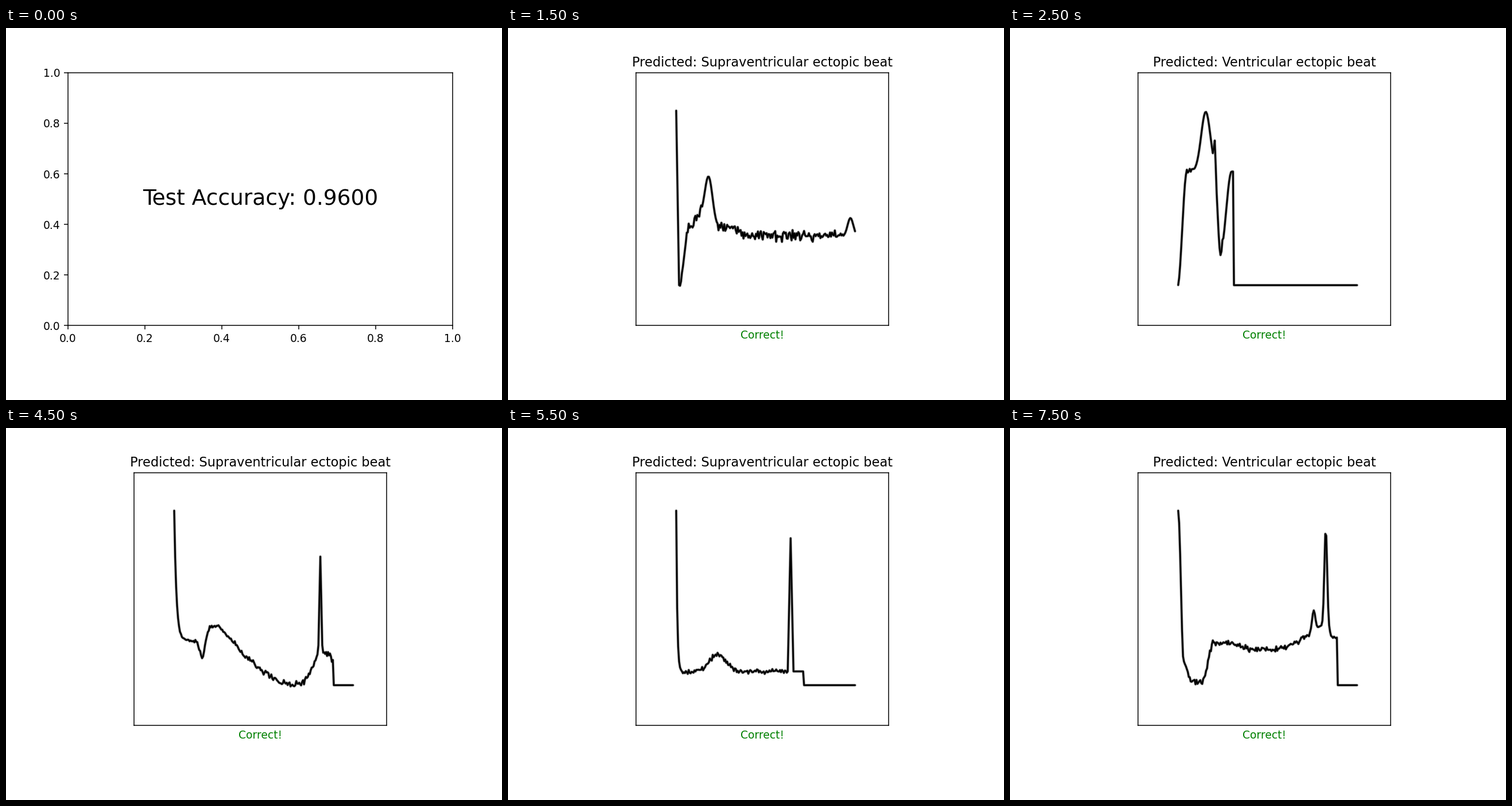
Recreate the animation shown at these times as a matplotlib script. Size 864x648 px, loop 8000 ms.

```python
import numpy as np
import matplotlib.pyplot as plt
from matplotlib.animation import FuncAnimation

W, H, DPI = 864, 648, 135
FLAT = 448                            # y of the zero padding
X = np.linspace(293, 604.5, 187)      # sample positions in stage pixels
STROKES = [(4.9, 0.22), (3.8, 0.5), (2.5, 1.0)]  # soft edge: width in px, alpha

rng = np.random.default_rng(7)


# All heights are in pixels; positive heights point up the stage.
def part(x0, x1):
    return np.clip((X - x0) / (x1 - x0), 0, 1)


def ramp(x0, x1):
    t = part(x0, x1)
    return t * t * (3 - 2 * t)


def bump(centre, height, width):
    return -height * np.exp(-((X - centre) / width) ** 2 / 2)


def spike(centre, height, half):
    centre = X[np.argmin(abs(X - centre))]
    return -height * np.clip(1 - abs(X - centre) / half, 0, 1)


def decay(height, span):
    return -height * np.exp(-(X - X[0]) / span)


def jitter(x0, x1, amp):
    noise = np.clip(rng.normal(0, amp, X.size), -2.2 * amp, 2.2 * amp)
    return np.where((X > x0) & (X < x1), noise, 0)


def pad(y, x0):
    return np.where(X > x0, FLAT, y)


def late_peak():
    y = 390 + decay(200, 3) + bump(350, 55, 14) + spike(529, 246, 4)
    return pad(y + jitter(300, 522, 2.5), 558)


def noisy_rest():
    y = 348 + 15 * ramp(380, 425)
    y += 100 * (1 - ramp(298, 315)) - 304 * (1 - part(293, 298))
    y += bump(333, 18, 9) + bump(349.5, 86, 6.8) + bump(596.5, 32, 5)
    return y + jitter(299, 338, 4) + jitter(364, 586, 5)


def tall_hump():
    y = 450 - 200 * ramp(292, 308) + bump(341, 104, 8) + spike(357, 40, 3)
    y += 147 * ramp(356, 367) * (1 - ramp(366, 386)) + spike(370.5, 12, 2)
    return pad(y + jitter(305, 320, 2), 389.5)


def wide_hump():
    y = 385 + decay(241, 5) + bump(362, 100, 16)
    y += -30 * ramp(390, 430) + bump(445, 140, 5)
    return pad(y + jitter(308, 432, 1.5), 462)


def sloping():
    y = 370 + decay(226, 3.8) + bump(341.5, -30, 4) - 24 * ramp(342, 358)
    y += 101 * np.sin(np.pi / 2 * part(372, 507)) - 57 * part(507, 544) ** 2
    y += spike(547, 166, 3.6) + 14 * ramp(558, 569)
    return pad(y + jitter(303, 391, 1.5) + jitter(391, 540, 2.8)
               + jitter(551, 569, 3), 570)


def late_spike():
    y = 424 + decay(280, 1.8) + bump(365, 30, 14) + spike(493, 232, 5)
    return pad(y + jitter(303, 486, 2), 515)


def mid_spike():
    y = 430 - 286 * (1 - ramp(293, 299)) + spike(302, 18, 1.7)
    y += bump(339, -8, 2.5) - 14 * ramp(340, 348) + spike(348, 8, 2)
    y += 14 * ramp(375, 402) + spike(404.5, -18, 3.5)
    y += spike(422, 284, 5) + 14 * ramp(428, 434)
    return pad(y + jitter(303, 402, 1.8) + jitter(428, 444, 3), 444)


def basin():
    y = 442 - 264 * (1 - ramp(293, 302.5)) - 34 * (1 - ramp(302, 316))
    y += -68 * ramp(334, 355) + 11 * ramp(380, 420)
    y += -40 * part(468, 540) ** 1.5 + bump(529, 36, 2.8)
    y += bump(550, 169, 2.4) + 20 * ramp(552, 562)
    return pad(y + jitter(303, 522, 2.4) + jitter(557, 569, 2), 570)


SUPRA, VENTR = "Supraventricular", "Ventricular"
BEATS = [(SUPRA, late_peak()), (SUPRA, noisy_rest()), (VENTR, tall_hump()),
         (VENTR, wide_hump()), (SUPRA, sloping()), (SUPRA, late_spike()),
         (SUPRA, mid_spike()), (VENTR, basin())]

fig = plt.figure(figsize=(W / DPI, H / DPI), dpi=DPI, facecolor="white")

intro = fig.add_axes([0.125, 0.2, 0.775, 0.68])
intro.text(0.5, 0.5, "Test Accuracy: 0.9600", fontsize=20,
           ha="center", va="center")

left, right = 223, 663
bottom, top = 0.8 * H, 0.12 * H
chart = fig.add_axes([left / W, 0.2, (right - left) / W, 0.68])
chart.set(xlim=(left, right), ylim=(bottom, top), xticks=[], yticks=[])
chart.set_xlabel("Correct!", color="green")
title = chart.set_title("")
lines = [chart.plot([], [], color="black", alpha=alpha, lw=px * 72 / DPI,
                    solid_capstyle="round", solid_joinstyle="round")[0]
         for px, alpha in STROKES]


def draw(i):
    # the intro holds for one half second, each beat for two
    intro.set_visible(i == 0)
    chart.set_visible(i > 0)
    if i > 0:
        label, y = BEATS[(i - 1) // 2]
        title.set_text(f"Predicted: {label} ectopic beat")
        for line in lines:
            line.set_data(X, y)
    return [title, *lines]


anim = FuncAnimation(fig, draw, frames=16, interval=500, repeat=True,
                     repeat_delay=0, blit=False)
plt.show()
```
